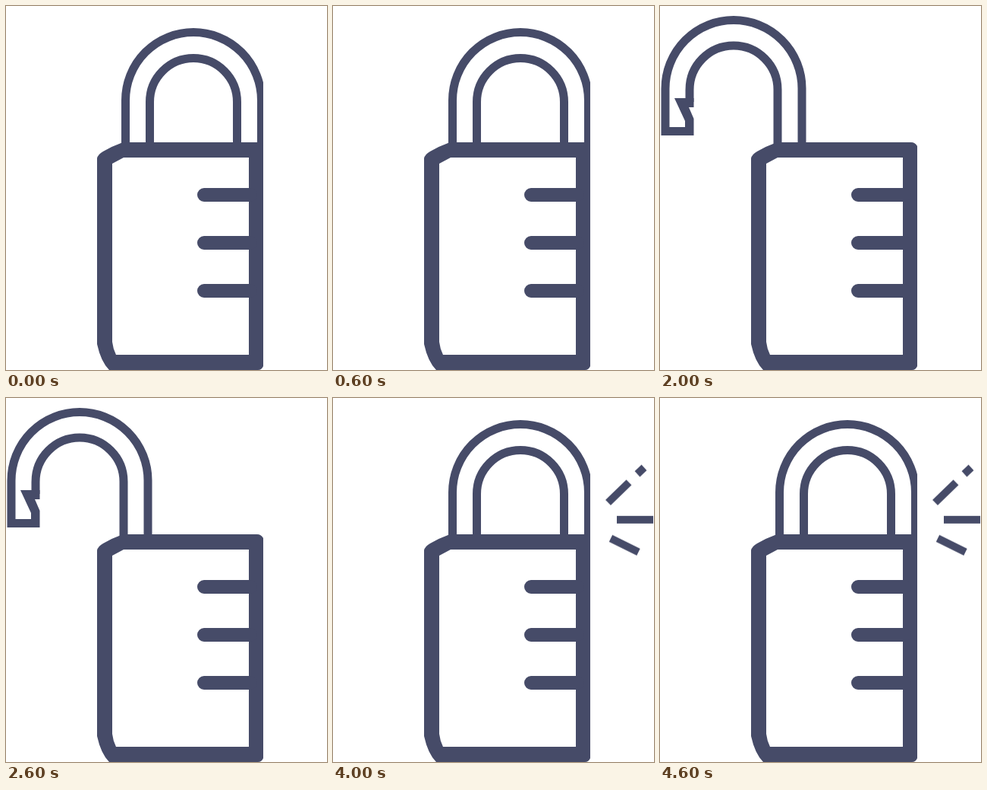
Recreate the animation shown at these times as an HTML page. Size 423 by 478 pixels, loop 5000 ms.

```html
<!DOCTYPE html>
<html lang="en">
<head>
<meta charset="utf-8">
<title>Padlock</title>
<style>
  html, body { margin: 0; width: 100%; height: 100%; overflow: hidden; background: #fff; }
  svg { display: block; width: 423px; height: 478px; }
  .ink { fill: #464b68; }
  .line { fill: none; stroke: #464b68; stroke-width: 11; }
  .tick { stroke-width: 18; stroke-linecap: round; }
  .spark { stroke-width: 10; }

  /* Every pose holds for one second, then cuts to the next. */
  #closed, #open, #sparks { animation: 5s step-end infinite; }
  #closed { animation-name: closed; }
  #open { animation-name: open; }
  #sparks { animation-name: sparks; }

  @keyframes closed {
    0%, 80% { visibility: visible; }
    20% { visibility: hidden; }
  }
  @keyframes open {
    0%, 80% { visibility: hidden; transform: translate(0, 0); }
    20% { visibility: visible; transform: translate(0, 0); }
    40% { visibility: visible; transform: translate(345px, 4px) scale(-1, 1); }
    60% { visibility: visible; transform: translate(-2px, 7px); }
  }
  @keyframes sparks {
    0%, 40% { visibility: hidden; transform: translate(0, 0); }
    20% { visibility: visible; transform: translate(0, 0); }
    80% { visibility: visible; transform: translate(-1px, -1.2px); }
  }
</style>
</head>
<body>
<svg viewBox="0 0 423 478">
  <clipPath id="edge"><rect width="339" height="478"/></clipPath>

  <g clip-path="url(#edge)">
    <g id="closed" class="line">
      <path d="M157.5 190V124A89.5 89.5 0 0 1 336.5 124V190"/>
      <path d="M189.5 190V126A57.5 57.5 0 0 1 304.5 126V190"/>
    </g>
    <g id="open">
      <path class="line" d="M158 190V104.5A90 90 0 0 1 338 104.5V160.5H306"/>
      <path class="line" d="M190 190V106A58 58 0 0 1 306 106V122"/>
      <path class="ink" d="M300.5 117H326L312 147V166H300.5V144L307 129H300.5Z"/>
    </g>
  </g>

  <path class="ink" fill-rule="evenodd" d="M154 179H331Q336 179 339 184V473Q337 478 332 478H136
    Q125 467 120 444V200Q121 195 128 191Q140 184 154 179Z
    M155 199L140 207V441Q141 450 145 458H320V199Z"/>
  <path class="line tick" d="M261 248H322M261 311H322M261 374H322"/>

  <g id="sparks" class="line spark">
    <path d="M363.5 138.5L391 112M402 101L411 92.5M375 161H423M367 185.5L403.5 203.5"/>
  </g>
</svg>
</body>
</html>
```
